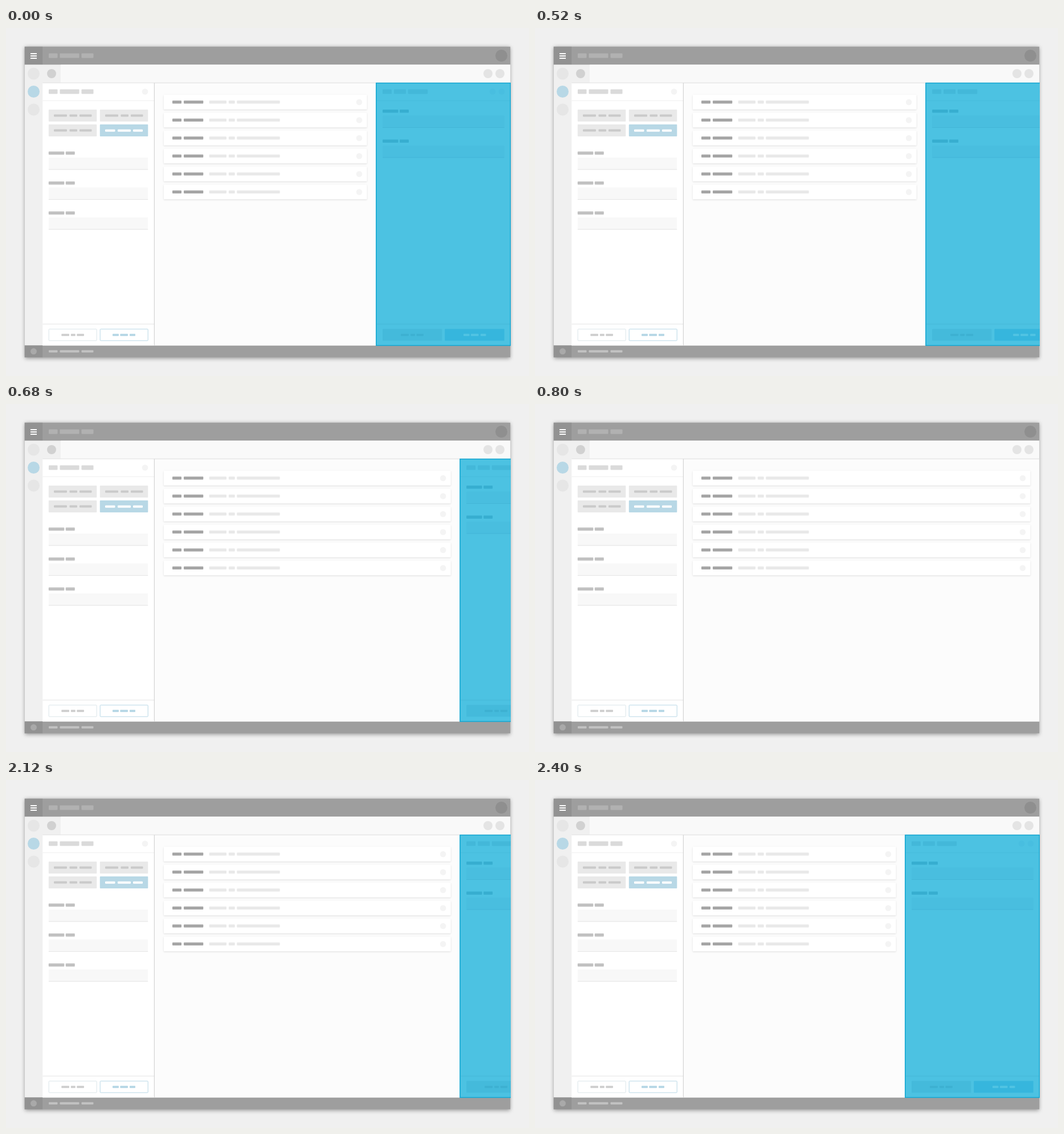
Recreate the animation shown at these times as an HTML page with a canvas. Size 918 by 610 pixels, loop 3600 ms.

```html
<!DOCTYPE html>
<html lang="en">
<head>
<meta charset="utf-8">
<title>Side panel</title>
<style>
  html, body { margin: 0; width: 100%; height: 100%; overflow: hidden; background: #f0f0f0; }
  canvas { display: block; }
</style>
</head>
<body>
<canvas id="stage" width="918" height="610"></canvas>
<script>
const c = document.getElementById('stage').getContext('2d');
const LOOP = 3600, STEP = 40, STEPS = 10, WIDTH = 236;

function box(x, y, w, h, color, r = 0) {
  c.fillStyle = color;
  c.beginPath();
  c.roundRect(x, y, w, h, r);
  c.fill();
}

function dot(x, y, r, color) {
  c.fillStyle = color;
  c.beginPath();
  c.arc(x, y, r, 0, 7);
  c.fill();
}

// A row of placeholder words: pairs of left edge and width
function words(x, y, h, color, ...parts) {
  for (let i = 0; i < parts.length; i += 2) box(x + parts[i], y, parts[i + 1], h, color, 1);
}

function outline(x, y, w, h, color, width, r = 0) {
  c.strokeStyle = color;
  c.lineWidth = width;
  c.beginPath();
  c.roundRect(x, y, w, h, r);
  c.stroke();
}

function shadowed(alpha, blur, dy, draw) {
  c.save();
  c.shadowColor = `rgba(0,0,0,${alpha})`;
  c.shadowBlur = blur;
  c.shadowOffsetY = dy;
  draw();
  c.restore();
}

function field(x, y, w, label, fill, line) {
  words(x, y, 5.5, label, 0, 27.5, 30, 16);
  box(x, y + 10.5, w, 21, fill, 1);
  box(x, y + 31, w, 1, line);
}

function drawFrame() {
  box(0, 0, 918, 610, '#f0f0f0');
  shadowed(0.4, 7, 1.5, () => box(32.8, 32.8, 852.4, 544.5, '#9e9e9e'));

  // Title bar
  box(32.8, 32.8, 31.4, 31.5, '#929292');
  for (const y of [44, 48, 52]) box(43, y, 11, 2, '#fff');
  words(75, 44.5, 8, '#b1b1b1', 0, 15.5, 19.5, 34, 57.5, 21);
  dot(869.5, 48.5, 10.5, '#8f8f8f');

  // Toolbar and rail
  box(32.8, 64.3, 852.4, 492.2, '#f0f0f0');
  box(96, 64.3, 789.2, 31.7, '#f9f9f9');
  dot(80, 80, 8, '#d1d1d1');
  dot(846, 80, 8, '#e4e4e4');
  dot(867, 80, 8, '#e4e4e4');
  dot(48.5, 80, 10.5, '#e6e6e6');
  dot(48.5, 111.5, 10.5, '#b8d8e6');
  dot(48.5, 143, 10.5, '#e6e6e6');

  // Status bar
  box(32.8, 556.5, 31.4, 20.8, '#929292');
  dot(48.5, 566.8, 5.5, '#a9a9a9');
  words(75, 564.8, 4, '#c2c2c2', 0, 15.5, 19.5, 34, 57.5, 21);
}

function drawLeft() {
  box(64.3, 96, 195.7, 460.5, '#fff');
  words(75, 107.5, 8, '#dadada', 0, 15.5, 19.5, 34, 57.5, 21);
  dot(244, 111.5, 5.3, '#f4f4f4');
  box(64.3, 127, 195.7, 1, '#f0f0f0');

  for (const [x, y] of [[75, 143], [165, 143], [75, 169]]) {
    box(x - 0.2, y, 84.5, 21, '#e9e9e9', 1);
    words(x + 9, y + 8.5, 4, '#cacaca', 0, 23, 27.5, 13.5, 45, 21.5);
  }
  box(164.8, 169, 84.5, 21, '#b8d8e6', 1);
  words(174, 177.8, 4, '#fff', 0, 17.5, 22, 23, 49, 17);

  for (let i = 0; i < 3; i++) field(74.8, 216.5 + 52.5 * i, 174.4, '#c1c1c1', '#f8f8f8', '#e4e4e4');

  box(64.3, 518, 195.7, 2, '#f1f1f1');
  outline(75.2, 527.8, 84, 20.2, '#dbe5e9', 1, 1);
  words(97.3, 536, 4, '#d0d0d0', 0, 13.7, 16.5, 8, 27, 12.7);
  outline(165.2, 527.8, 84, 20.2, '#b8d8e6', 1, 1);
  words(187, 536, 4, '#b8d8e6', 0, 11, 13.3, 13.7, 30, 10);
}

function drawList(shift) {
  box(260, 96, 625.2, 460.5, '#fcfcfc');
  for (let i = 0; i < 6; i++) {
    const y = 117 + 31.5 * i;
    shadowed(0.13, 3, 1, () => box(276.8, y, 356.7 + shift, 25.8, '#fff', 1));
    words(292, y + 10.2, 5.3, '#a5a5a5', 0, 16, 20, 34.3);
    words(356.7, y + 10.2, 5.3, '#e9e9e9', 0, 30.3, 34.2, 10.8, 48.6, 75.4);
    dot(620 + shift, y + 13, 5.3, '#f4f4f4');
  }
  box(64.3, 95.7, 820.9, 1, '#e4e4e4');
  box(259.8, 96, 1, 460.5, '#d2d2d2');
}

function drawPanel(shift) {
  if (shift >= WIDTH) return;
  c.save();
  c.beginPath();
  c.rect(640, 90, 246, 470);
  c.clip();
  c.translate(shift, 0);
  box(649.3, 96, WIDTH + 0.7, 461, '#4cc2e2');
  words(661, 107.5, 8, '#43b8d9', 0, 16, 20, 21, 44.7, 34.5);
  dot(854, 111.5, 5.3, '#48bee0');
  dot(870, 111.5, 5.3, '#48bee0');
  box(650, 127, WIDTH, 1, '#47bcdc');
  field(661, 143, 213.7, '#37aed0', '#49bedf', '#43b6d7');
  field(661, 195.5, 213.7, '#37aed0', '#49bedf', '#43b6d7');
  box(650, 518, WIDTH, 2, '#48bddd');
  box(661, 527.5, 104.3, 20.8, '#44badb', 1);
  words(693, 536, 4, '#3db1d2', 0, 14, 17, 8, 27.5, 12.5);
  box(770.3, 527.5, 104.4, 20.8, '#36b6dd', 1);
  words(803, 536, 4, '#50c3e3', 0, 10.5, 13, 13.5, 30, 9.5);
  outline(649.9, 96.6, WIDTH - 0.4, 459.9, '#12a6d2', 1.5);
  c.restore();
}

// Accelerating curve; opening plays it backwards
function ease(u) {
  const v = 1 - u;
  return u * u * (1 + 0.9 * v + 0.3 * v ** 4);
}

// Share of a slide done at time t, held in even steps
function stepped(t, start) {
  const n = Math.floor((t - start) / STEP) + 1;
  return Math.max(0, Math.min(STEPS, n)) / STEPS;
}

function render(now) {
  const t = now % LOOP;
  const shift = WIDTH * ease(stepped(t, 440) - stepped(t, 2040));
  drawFrame();
  drawList(shift);
  drawLeft();
  box(64.3, 95.7, 820.9, 1, '#e4e4e4');
  box(259.8, 96, 1, 460.5, '#d2d2d2');
  drawPanel(shift);
}

let start;
function tick(now) {
  start ??= now;
  render(now - start);
  requestAnimationFrame(tick);
}
render(0);
requestAnimationFrame(tick);
</script>
</body>
</html>
```
